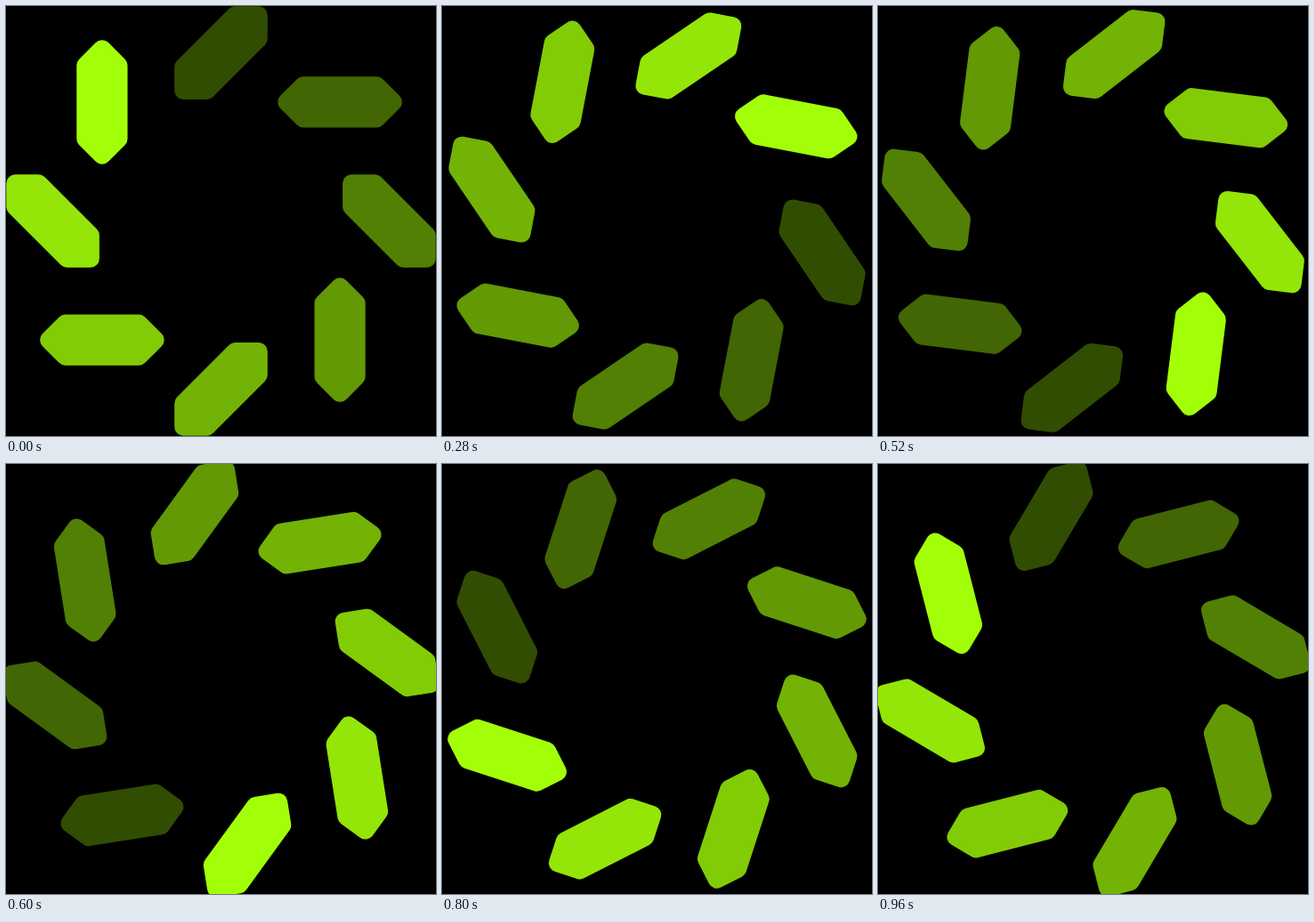
Recreate the animation shown at these times as an HTML page. Size 483x483 px, loop 1 s.

```html
<!DOCTYPE html>
<html lang="en">
<head>
<meta charset="utf-8">
<title>Spinner</title>
<style>
  html, body { margin: 0; width: 100%; height: 100%; overflow: hidden; background: #000; }
  svg { display: block; width: 100%; height: 100%; }
  polygon { fill: #a3ff08; stroke: #a3ff08; stroke-width: 20; stroke-linejoin: round; }
</style>
</head>
<body>
<svg viewBox="0 0 483 483"><g id="ring"></g></svg>
<script>
const LOOP = 1000, STEP = 40, COUNT = 8;
const CENTER = 241.5, RADIUS = 188.9;
const TIP = 59.8, HALF = 18.6, SHOULDER = TIP - HALF;

const ring = document.getElementById('ring');
const outline = [
  [TIP, 0], [SHOULDER, HALF], [-SHOULDER, HALF],
  [-TIP, 0], [-SHOULDER, -HALF], [SHOULDER, -HALF]
].join(' ');

for (let i = 0; i < COUNT; i++) {
  const bar = document.createElementNS('http://www.w3.org/2000/svg', 'polygon');
  bar.setAttribute('points', outline);
  bar.setAttribute('opacity', 0.3 + 0.1 * i);
  bar.setAttribute('transform',
    `rotate(${-90 + i * 360 / COUNT}) translate(${RADIUS} 0) rotate(45)`);
  ring.appendChild(bar);
}

// The ring turns once per loop, in steps of 40 ms.
function draw(ms) {
  const held = Math.floor((ms % LOOP + 0.5) / STEP) * STEP;
  const angle = 360 * held / LOOP;
  ring.setAttribute('transform', `translate(${CENTER} ${CENTER}) rotate(${angle})`);
}

const start = performance.now();
function tick() {
  draw(performance.now() - start);
  requestAnimationFrame(tick);
}
draw(0);
requestAnimationFrame(tick);
</script>
</body>
</html>
```
